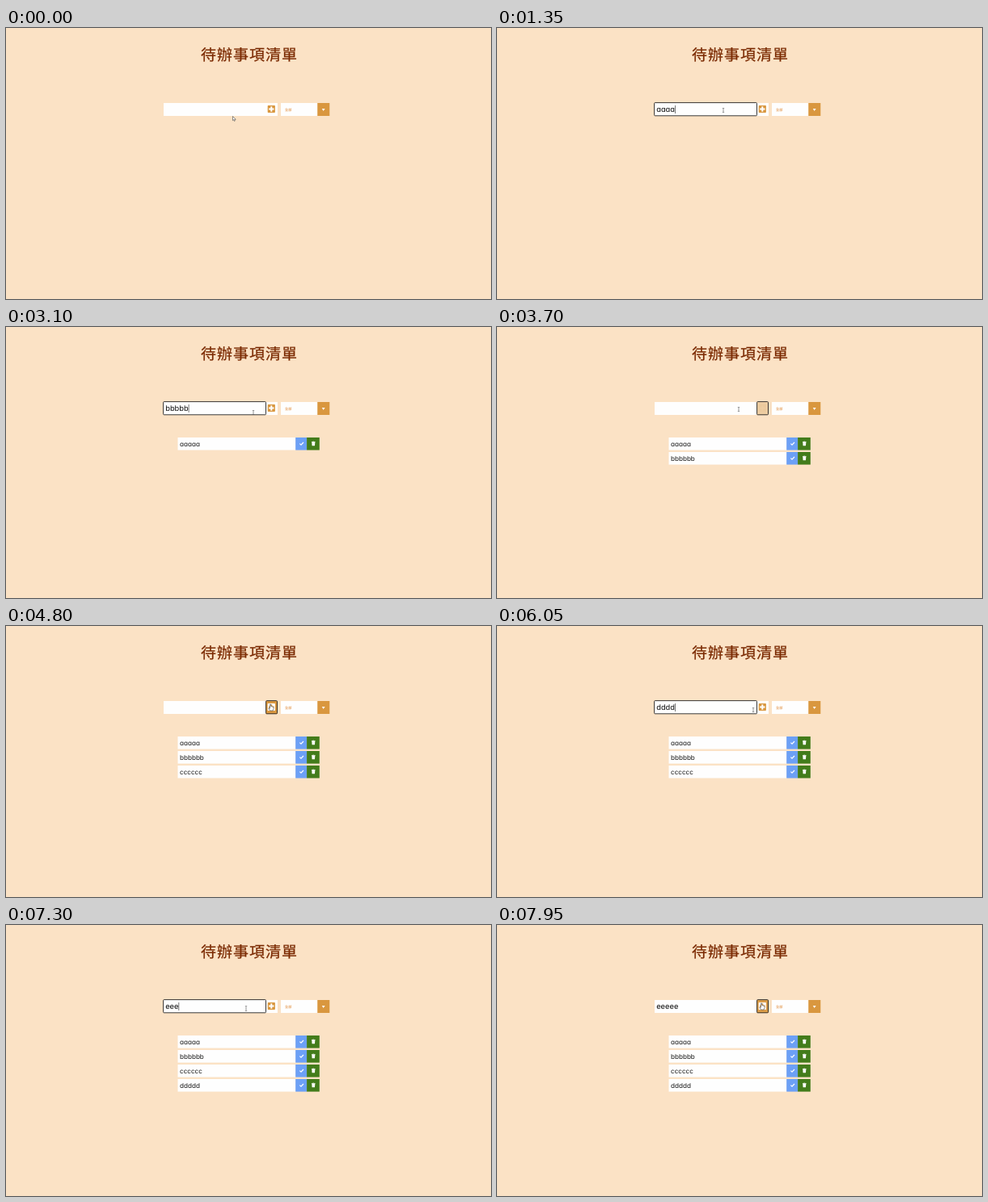
Animation of 600 by 336 pixels, one loop 8000 ms. Source, as an HTML page with a canvas:

```html
<!DOCTYPE html>
<html lang="zh-Hant">
<head>
<meta charset="utf-8">
<title>待辦事項清單</title>
<style>
html, body { margin: 0; width: 100%; height: 100%; overflow: hidden; background: #fbe2c5; }
canvas { display: block; width: 100vw; height: 100vh; }
</style>
</head>
<body>
<canvas id="stage"></canvas>
<script>
const W = 600, H = 336, LOOP = 8000;
const INK = '#7a2900', ORANGE = [217, 151, 63], WHITE = [255, 255, 255];
const LATIN = 'Inter, "Noto Sans", sans-serif';
const CJK = '"Noto Sans CJK TC", "Noto Sans CJK", sans-serif';
const KEY_STEP = 120;
const START = { x: 280.5, y: 109.5 }, BUTTON = { x: 328, y: 101 };

const canvas = document.getElementById('stage');
const ctx = canvas.getContext('2d');

// Each task: first key, button press, and where the pointer rests while typing.
const tasks = [
  { text: 'aaaaa',  type: 900,  press: 1600, x: 280, y: 102 },
  { text: 'bbbbbb', type: 2600, press: 3400, x: 306, y: 106 },
  { text: 'cccccc', type: 3960, press: 4640, x: 299, y: 102 },
  { text: 'ddddd',  type: 5600, press: 6280, x: 317, y: 104 },
  { text: 'eeeee',  type: 7040, press: 7870, x: 297, y: 103.5 }
];

// The remaining moments follow from the button presses.
tasks.forEach((task, i) => {
  const previous = i ? tasks[i - 1].press : 180;
  task.from = i ? BUTTON : START;
  task.arrive = previous + 160;
  task.focus = previous + 420;
  task.enter = task.press - 150;
  task.add = task.press + 90;
  task.leave = task.press + 210;
});

const clamp = v => Math.max(0, Math.min(1, v));
const easeOut = v => 1 - (1 - clamp(v)) ** 2;
const smooth = v => clamp(v) ** 2 * (3 - 2 * clamp(v));
const lerp = (a, b, p) => a + (b - a) * p;
const mix = (a, b, p) => `rgb(${a.map((v, i) => Math.round(lerp(v, b[i], p)))})`;
const latest = (moment, t) => tasks.filter(task => task[moment] <= t).pop();

function rect(x, y, w, h, color) {
  ctx.fillStyle = color;
  ctx.fillRect(x, y, w, h);
}

function poly(points, color, x = 0, y = 0) {
  ctx.beginPath();
  points.forEach(([px, py]) => ctx.lineTo(x + px, y + py));
  ctx.closePath();
  ctx.fillStyle = color;
  ctx.fill();
}

function text(str, x, y, font, color) {
  ctx.font = font;
  ctx.fillStyle = color;
  ctx.fillText(str, x, y);
}

// Single-storey form of the letter a
const round = str => str.replace(/a/g, 'ɑ');

function ring(x, w) {
  ctx.beginPath();
  ctx.roundRect(x, 92.6, w, 16.2, 1);
  ctx.strokeStyle = '#222';
  ctx.lineWidth = 0.9;
  ctx.stroke();
}

function hoverAt(t) {
  const task = latest('enter', t);
  if (!task) return 0;
  return t < task.leave ? easeOut((t - task.enter) / 300) : 1 - easeOut((t - task.leave) / 300);
}

function drawTitle() {
  ctx.letterSpacing = '1px';
  text('待辦事項清單', 241, 40.2, '19px ' + CJK, INK);
  ctx.strokeStyle = INK;
  ctx.lineWidth = 0.25;
  ctx.strokeText('待辦事項清單', 241, 40.2);
  ctx.letterSpacing = '0px';
}

function drawSelect() {
  rect(340, 93, 45.5, 16, '#fefefe');
  text('全部', 345, 102.6, 'bold 4.2px ' + CJK, '#e8ab70');
  rect(385.3, 93, 15, 16, mix(ORANGE, WHITE, 0));
  poly([[390.8, 99.9], [394.6, 99.9], [392.7, 103]], '#fff');
}

function drawButton(hover) {
  const back = mix(WHITE, ORANGE, hover), icon = mix(ORANGE, WHITE, hover);
  rect(321.5, 93, 14.3, 16, back);
  ctx.beginPath();
  ctx.roundRect(323.7, 96, 9.2, 9, 0.8);
  ctx.fillStyle = icon;
  ctx.fill();
  rect(325.1, 99.5, 6.4, 2, back);
  rect(327.3, 97.3, 2, 6.4, back);
}

function drawForm(t) {
  rect(195, 93, 140.8, 16, '#fefefe');
  drawButton(hoverAt(t));
  const task = latest('focus', t);
  if (!task) return;
  const keys = Math.floor((t - task.type) / KEY_STEP) + 1;
  const count = Math.max(0, Math.min(task.text.length, keys));
  const typed = t < task.add ? round(task.text.slice(0, count)) : '';
  text(typed, 197.2, 104.1, '9.3px ' + LATIN, '#111');
  if (t >= task.press) {
    ring(321.6, 13.9);
    return;
  }
  ring(194.6, 126.9);
  const lastKey = count ? task.type + (count - 1) * KEY_STEP : task.focus;
  if ((t - lastKey) % 1000 < 500) {
    rect(197.3 + ctx.measureText(typed).width, 96, 0.6, 10, '#222');
  }
}

function drawItem(label, y) {
  rect(212.5, y, 146, 15.6, '#fefefe');
  text(round(label), 215, y + 10.6, '8.15px ' + LATIN, '#1c1c1c');
  rect(358.2, y, 14, 15.6, '#6ca0f6');
  rect(372.1, y, 15.7, 15.6, '#437c1b');

  ctx.beginPath();
  ctx.moveTo(363.4, y + 7.6);
  ctx.lineTo(365, y + 9.1);
  ctx.lineTo(368, y + 6);
  ctx.strokeStyle = '#fff';
  ctx.lineWidth = 1.2;
  ctx.stroke();

  rect(378, y + 5.1, 4.6, 0.8, '#fff');
  rect(379.4, y + 4.7, 1.8, 0.5, '#fff');
  poly([[378.3, 6.1], [382.3, 6.1], [382, 10.2], [378.6, 10.2]], '#fff', 0, y);
}

function drawOutlined(points, x, y) {
  poly(points, '#fff', x, y);
  ctx.strokeStyle = '#444';
  ctx.lineWidth = 0.6;
  ctx.stroke();
}

function drawArrow(x, y) {
  drawOutlined([[0, 0], [0, 5.2], [1.2, 4.2], [2, 6], [2.8, 5.6], [2.1, 3.9], [3.7, 3.8]], x, y);
}

function drawHand(x, y) {
  drawOutlined([[-1.4, -4], [-0.4, -4], [-0.2, -1.4], [2.8, -0.7], [3, 1.4],
    [2.2, 4], [-1.4, 4], [-3.2, 0.9], [-1.5, 1.2]], x, y);
}

function drawBeam(x, y) {
  rect(x - 0.3, y - 2.7, 0.6, 5.4, '#555');
  [-3, 2.5].forEach(dy => rect(x - 1.2, y + dy, 2.4, 0.5, '#555'));
}

function drawPointer(t) {
  const task = latest('arrive', t) || tasks[0];
  const home = smooth((t - task.arrive) / 140);
  const away = smooth((t - task.enter + 50) / 100);
  const [x, y] = ['x', 'y'].map(k => lerp(lerp(task.from[k], task[k], home), BUTTON[k], away));
  const hovered = latest('enter', t);
  if (hovered && t < hovered.leave) drawHand(x, y);
  else if (y < 108.5) drawBeam(x, y);
  else drawArrow(x, y);
}

function draw(t) {
  rect(0, 0, W, H, '#fbe2c5');
  drawTitle();
  drawForm(t);
  drawSelect();
  tasks.filter(task => task.add <= t).forEach((task, i) => drawItem(task.text, 137 + i * 18));
  drawPointer(t);
}

function resize() {
  const ratio = window.devicePixelRatio || 1;
  canvas.width = Math.round(innerWidth * ratio);
  canvas.height = Math.round(innerHeight * ratio);
  ctx.setTransform(canvas.width / W, 0, 0, canvas.height / H, 0, 0);
  ctx.textRendering = 'geometricPrecision';
}

function tick() {
  draw(performance.now() % LOOP);
  requestAnimationFrame(tick);
}

addEventListener('resize', resize);
resize();
tick();
</script>
</body>
</html>
```
